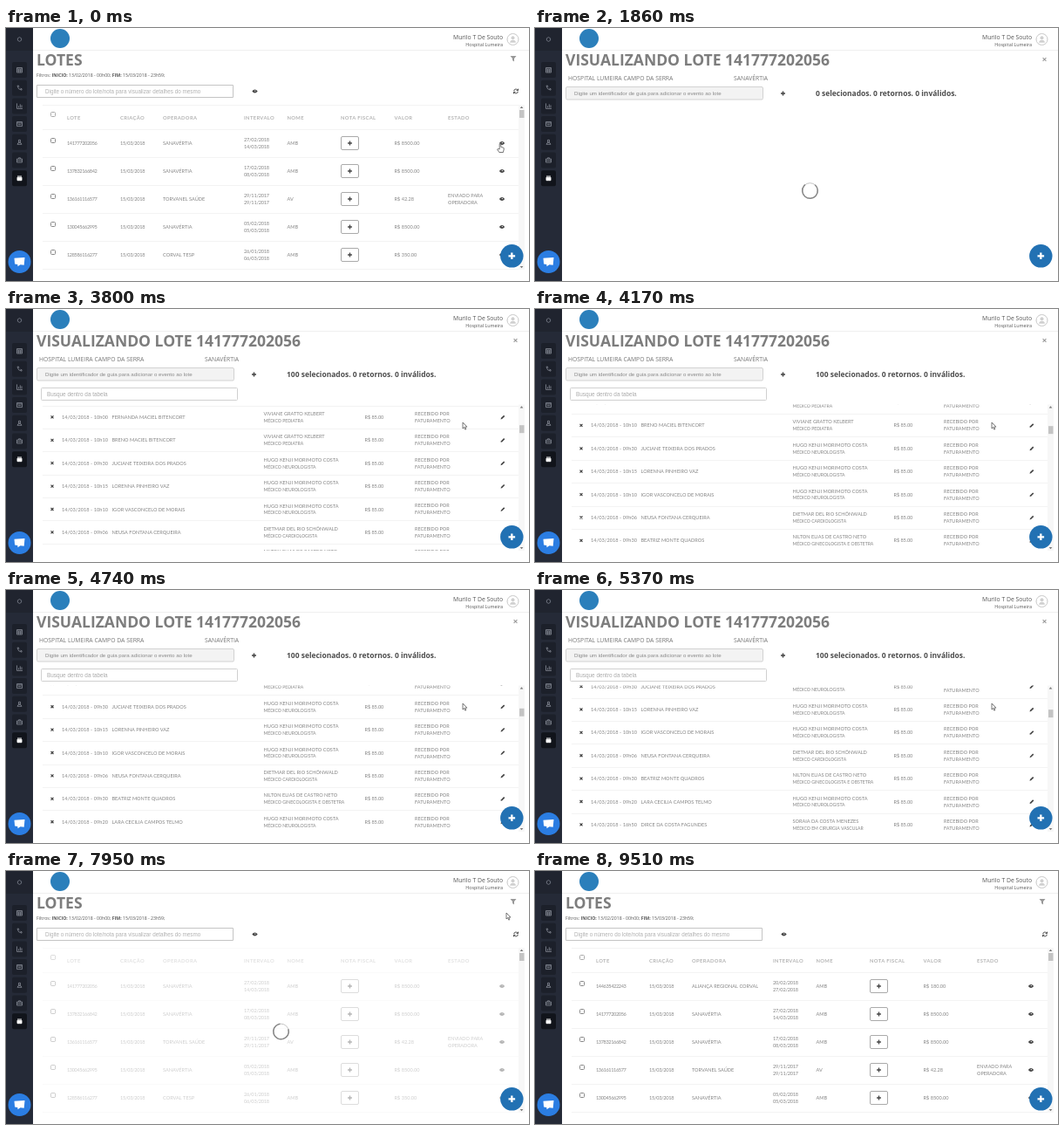
An HTML page with a canvas that plays this animation: 600x290 px, repeating every 9.84 s.

```html
<!DOCTYPE html>
<html lang="pt-BR">
<head>
<meta charset="utf-8">
<title>Lotes</title>
<style>
  html, body { margin: 0; width: 100%; height: 100%; overflow: hidden; background: #fff; }
  canvas { display: block; width: 600px; height: 290px; }
</style>
</head>
<body>
<canvas id="stage"></canvas>
<script>
const LOOP = 9840, OPEN = 720, LOADED = 2400, CLOSE = 7350, READY = 8990, NEW_LOT = 9510;
const canvas = document.getElementById('stage');
const ctx = canvas.getContext('2d');
const dpr = window.devicePixelRatio || 1;
canvas.width = 600 * dpr;
canvas.height = 290 * dpr;

const SANS = '"Open Sans", sans-serif', TABLE = 'Lato, sans-serif', INPUT = '"Liberation Sans", sans-serif';
const GREY = '#848484', INK = '#444', LINE = '#f3f3f3';

const lots = [
  ['144635422243', 'ALIANÇA REGIONAL CORVAL', '20/02/2018', '27/02/2018', 'AMB', '180.00'],
  ['141777202056', 'SANAVÉRTIA', '27/02/2018', '14/03/2018', 'AMB', '8500.00'],
  ['137832166842', 'SANAVÉRTIA', '17/02/2018', '08/03/2018', 'AMB', '8500.00'],
  ['136161116577', 'TORVANEL SAÚDE', '29/11/2017', '29/11/2017', 'AV', '42.28', true],
  ['130045662995', 'SANAVÉRTIA', '05/02/2018', '05/03/2018', 'AMB', '8500.00'],
  ['128586116277', 'CORVAL TESP', '26/01/2018', '06/03/2018', 'AMB', '350.00']
];

const doctors = {
  vascular: ['SORAIA DA COSTA MENEZES', 'EM CIRURGIA VASCULAR'],
  ear: ['PATRICIA LACERDA NOVAES', 'OTORRINOLARINGOLOGISTA'],
  birth: ['NILTON ELIAS DE CASTRO NETO', 'GINECOLOGISTA E OBSTETRA'],
  nerve: ['HUGO KENJI MORIMOTO COSTA', 'NEUROLOGISTA'],
  child: ['VIVIANE GRATTO KELBERT', 'PEDIATRA'],
  heart: ['DIETMAR DEL RIO SCHÖNWALD', 'CARDIOLOGISTA']
};

const visits = [
  ['16h50', 'DIRCE DA COSTA FAGUNDES', 'vascular'],
  ['15h45', 'RENATO AUGUSTO DE PAULA LEAL', 'ear'],
  ['16h40', 'SABRINA VALERIA FREITAS GALVAO', 'birth'],
  ['15h30', 'SABRINA VALERIA FREITAS GALVAO', 'nerve'],
  ['14h00', 'ROSANA MENDES DE BRITO', 'ear'],
  ['13h50', 'IVONETE MARQUES COSTA TAVARES', 'nerve'],
  ['13h30', 'OTAVIO LEMOS DA COSTA', 'nerve'],
  ['11h40', 'ELISA PRADO MONTEIRO', 'heart'],
  ['11h10', 'DAVI CORDEIRO FAGUNDES', 'child'],
  ['10h30', 'LIVIA CORDEIRO FAGUNDES', 'child'],
  ['10h00', 'FERNANDA MACIEL BITENCORT', 'child'],
  ['10h10', 'BRENO MACIEL BITENCORT', 'child'],
  ['09h30', 'JUCIANE TEIXEIRA DOS PRADOS', 'nerve'],
  ['10h15', 'LORENNA PINHEIRO VAZ', 'nerve'],
  ['10h10', 'IGOR VASCONCELO DE MORAIS', 'nerve'],
  ['09h06', 'NEUSA FONTANA CERQUEIRA', 'heart'],
  ['09h30', 'BEATRIZ MONTE QUADROS', 'birth'],
  ['09h20', 'LARA CECILIA CAMPOS TELMO', 'nerve']
];

const scrollKeys = [[3050, 0], [3800, 278], [3920, 290], [4050, 290], [4170, 295], [4370, 295],
  [4740, 321], [5040, 345], [5370, 345], [5840, 0]];
const cursorKeys = [[3050, 567, 133], [3290, 524, 130], [5800, 524, 130], [6090, 584, 34],
  [CLOSE, 584, 34], [7700, 574, 48]];

// Value of column `col` at time t, linear between keys.
function track(keys, t, col = 1) {
  const next = keys.findIndex(k => k[0] > t);
  if (next < 0) return keys[keys.length - 1][col];
  if (next === 0) return keys[0][col];
  const a = keys[next - 1], b = keys[next];
  return a[col] + (b[col] - a[col]) * (t - a[0]) / (b[0] - a[0]);
}

// y is the middle of the capitals.
function text(str, x, y, size, { font = TABLE, weight = 400, color = GREY, gap = 0, align = 'left' } = {}) {
  ctx.font = `${weight} ${size}px ${font}`;
  ctx.letterSpacing = gap + 'px';
  ctx.textAlign = align;
  ctx.fillStyle = color;
  ctx.fillText(str, x, y + size * 0.36);
}

function box(x, y, w, h, fill, stroke, radius = 0) {
  ctx.beginPath();
  ctx.roundRect(x, y, w, h, radius);
  paint(fill, stroke);
}

function disc(x, y, r, fill, stroke) {
  ctx.beginPath();
  ctx.arc(x, y, r, 0, 7);
  paint(fill, stroke);
}

function paint(fill, stroke, width = 1) {
  ctx.lineWidth = width;
  if (fill) { ctx.fillStyle = fill; ctx.fill(); }
  if (stroke) { ctx.strokeStyle = stroke; ctx.stroke(); }
}

function path(d, x, y, fill, stroke, width = 1) {
  ctx.save();
  ctx.translate(x, y);
  const shape = new Path2D(d);
  ctx.lineWidth = width;
  if (fill) { ctx.fillStyle = fill; ctx.fill(shape); }
  if (stroke) { ctx.strokeStyle = stroke; ctx.stroke(shape); }
  ctx.restore();
}

const rule = y => box(42, Math.round(y), 546, 1, LINE);
const plus = (x, y, r, color, width) => path(`M${-r} 0H${r}M0 ${-r}V${r}`, x, y, null, color, width);
const cross = (x, y, r, color, width) => path(`M${-r} ${-r}L${r} ${r}M${r} ${-r}L${-r} ${r}`, x, y, null, color, width);

function eye(x, y) {
  path('M-3.2 0Q0 -4.2 3.2 0Q0 4.2 -3.2 0Z', x, y, INK);
  disc(x + 0.3, y - 0.4, 0.7, '#fff');
}

function scrollbar(top, thumb) {
  box(588, top, 7, 277 - top, '#f7f7f7');
  box(589, thumb, 5.5, 9, '#c4c4c4');
  path('M-1.8 1L0 -1.2L1.8 1Z', 591.5, top + 3, '#777');
  path('M-1.8 -1L0 1.2L1.8 -1Z', 591.5, 274, '#777');
}

function headings(items, y) {
  for (const [label, x] of items) text(label, x, y, 5.8, { weight: 700, color: '#b4b4b4', gap: 0.35 });
}

function sidebar() {
  box(0, 0, 31, 290, '#252a37');
  box(0, 0, 31, 26, '#20242f');
  path('M0 -2.4L2.1 -1.2V1.2L0 2.4L-2.1 1.2V-1.2Z', 15.5, 13, null, '#7d828e', 0.8);
  const icons = [
    'M-3 -2.5H3V3H-3ZM-3 -1H3M-1 -1V3M1 -1V3M-3 1H3',
    'M-2.5 -2.5Q-2 2 2.5 2.5L2.6 1L1 .5M-2.5 -2.5L-1 -2.6L-.6 -1',
    'M-3 -3V3H3.5M-1 2V0M.8 2V-2M2.5 2V-1',
    'M-3 -2.5H3V2.5H-3ZM-3 -1.2H3M-1.8 .6H1.8',
    'M-1 -2.5H1V0H-1ZM-2.5 2.5Q-2 .5 0 .5T2.5 2.5Z',
    'M-3 -1.5H3V2.5H-3ZM-1 -1.5V-2.7H1V-1.5M-3 .5H3',
    'M-2.5 -1H2.5V2.5H-2.5ZM-2.5 -2.2H2.5'
  ];
  icons.forEach((d, i) => {
    const y = 48 + i * 20.7, active = i === 6;
    box(7, y - 9, 17, 18, active ? '#11141b' : '#1c202a', null, 2);
    path(d, 15.5, y, active ? '#fff' : null, active ? '#fff' : '#7d828d', 0.9);
  });
}

function header() {
  box(31, 25, 569, 1, '#f0f0f0');
  disc(62, 12, 11, '#2b7fbb');
  text('Murilo T De Souto', 570, 11, 6.8, { font: SANS, color: '#555', align: 'right' });
  text('Hospital Lumeira', 570, 19.5, 5.4, { font: SANS, color: '#555', align: 'right' });
  disc(581.5, 13, 6.5, '#fff', '#c8c8c8');
  disc(581.5, 11.3, 2, '#d0d0d0');
  path('M-3.5 3.8Q-3 .8 0 .8T3.5 3.8Z', 581.5, 13, '#d0d0d0');
}

function title(str) {
  text(str, 35, 37, 17.53, { font: SANS, weight: 700, color: '#7d7d7d' });
}

function lotRow(lot, y) {
  const [id, operator, from, to, name, value, sent] = lot;
  box(51.5, y - 5.5, 5, 5, '#fff', '#888', 1);
  text(id, 70, y, 5.6, { gap: -0.38 });
  text('15/03/2018', 131, y, 5.6, { gap: -0.28 });
  text(operator, 180, y, 5.6);
  text(from, 273, y - 4, 5.6, { gap: -0.22 });
  text(to, 273, y + 4, 5.6, { gap: -0.22 });
  text(name, 322.5, y, 5.6);
  box(384.5, y - 7.5, 20, 15, '#fff', '#aaa', 1.5);
  plus(394.5, y, 2.4, INK, 1.3);
  text('R$ ' + value, 445.5, y, 5.6);
  if (sent) {
    text('ENVIADO PARA', 507, y - 4, 5.5);
    text('OPERADORA', 507, y + 4, 5.5);
  }
  eye(569, y);
  rule(y + 16);
}

function lotsPage(t) {
  title('LOTES');
  let x = 35;
  [['Filtros: '], ['INICIO: ', 700], ['13/02/2018 - 00h00; '], ['FIM: ', 700], ['15/03/2018 - 23h59;']].forEach(([part, weight = 400]) => {
    text(part, x, 54.5, 5.2, { font: SANS, weight, color: '#555' });
    x += ctx.measureText(part).width;
  });
  path('M-3.5 -3H3.5L1 0V3.5L-1 2V0Z', 582, 35, '#999');
  box(35.5, 65.5, 225, 14, '#fff', '#c4c4c4');
  text('Digite o número do lote/nota para visualizar detalhes do mesmo', 45, 72.5, 6.3, { font: INPUT, color: '#b0b0b0' });
  eye(285.5, 72.5);
  path('M-2.3 -.4A2.3 2.3 0 0 1 1.8 -1.5M2.3 .4A2.3 2.3 0 0 1 -1.8 1.5M2.5 -2.8V-.8H.6M-2.5 2.8V.8H-.6', 585, 72.5, null, INK);

  ctx.save();
  ctx.beginPath();
  ctx.rect(36, 88, 552, 189);
  ctx.clip();
  if (t >= CLOSE) ctx.globalAlpha = track([[8800, 0.4], [READY, 1]], t);
  rule(88);
  box(51.5, 96.5, 5, 5, '#fff', '#aaa', 1);
  headings([['LOTE', 70], ['CRIAÇÃO', 131], ['OPERADORA', 180], ['INTERVALO', 273], ['NOME', 322.5],
    ['NOTA FISCAL', 384], ['VALOR', 445.5], ['ESTADO', 507]], 102.5);
  rule(116);
  const first = t >= NEW_LOT ? 0 : 1;
  lots.slice(first, first + 5).forEach((lot, i) => lotRow(lot, 132 + 32 * i));
  ctx.restore();
  scrollbar(88, 94);
  if (t >= CLOSE && t < READY) spinner(t, 184);
}

function visitRow([time, patient, key], y) {
  const [name, field] = doctors[key];
  cross(53, y, 1.5, INK, 1.2);
  text('14/03/2018 - ' + time, 64, y, 5.6, { gap: 0.06 });
  text(patient, 121.5, y, 5.6);
  text(name, 295.5, y - 4, 5.6);
  text('MÉDICO ' + field, 295.5, y + 4, 5.1);
  text('R$ 85.00', 411.5, y, 5.6, { gap: -0.1 });
  text('RECEBIDO POR', 469, y - 4, 5.5);
  text('FATURAMENTO', 469, y + 4, 5.5);
  path('M-2.5 2.5L-2 .9L1.1 -2.2L2.3 -1L-.9 2.1Z', 570, y, INK);
  rule(y + 13);
}

function visitTable(t) {
  const scroll = track(scrollKeys, t);
  box(40.5, 90.5, 225, 14, '#fff', '#d0d0d0', 1);
  text('Busque dentro da tabela', 47, 97.5, 6.4, { font: INPUT, color: '#aaa' });
  ctx.save();
  ctx.beginPath();
  ctx.rect(36, 109.5, 552, 167.5);
  ctx.clip();
  headings([['HORÁRIO', 64], ['PACIENTE', 121.5], ['PROFISSIONAL', 295.5], ['VALOR', 411.5],
    ['ESTADO', 469], ['RETORNO', 527]], 118 - scroll);
  rule(125 - scroll);
  for (let i = 0; i < 100; i++) {
    const y = 138 + 26.4 * i - scroll;
    if (y > 94 && y < 295) visitRow(visits[i % visits.length], y);
  }
  ctx.restore();
  scrollbar(109.5, 116.5 + scroll * 0.06);
}

function lotView(t) {
  const loaded = t >= LOADED;
  title('VISUALIZANDO LOTE 141777202056');
  text('HOSPITAL LUMEIRA CAMPO DA SERRA', 38, 57.5, 6.8, { font: SANS, color: '#777' });
  text('SANAVÉRTIA', 228, 57.5, 6.8, { font: SANS, color: '#777' });
  cross(584.5, 36, 1.9, '#999', 1.1);
  box(35.5, 67.5, 226, 14.5, '#f3f3f3', '#d2d2d2', 1.5);
  text('Digite um identificador de guia para adicionar o evento ao lote', 45, 75, 6.15, { font: INPUT, color: '#888' });
  plus(284.5, 75, 2.5, INK, 1.5);
  text(`${loaded ? 100 : 0} selecionados. 0 retornos. 0 inválidos.`, 322, 75, 8.47, { font: SANS, weight: 700, color: '#4c4c4c' });
  if (loaded) visitTable(t);
  else spinner(t, 186.5);
}

function spinner(t, y) {
  const angle = t / 1000 * 2 * Math.PI;
  disc(315.5, y, 8.8, null, '#c4c4c4');
  ctx.beginPath();
  ctx.arc(315.5, y, 8.8, angle, angle + 4.9);
  paint(null, '#888', 1.5);
}

function floatingButtons() {
  disc(15.5, 268, 13, '#2b7de2');
  path('M-6 -3.8L6 -4.6L5.2 4.2L1 3.7L-2 5.8L-2.2 3.4L-5.4 3Z', 15.5, 267.5, '#fff');
  disc(580.3, 261.3, 13.2, '#2271b3');
  plus(580.3, 261.3, 3.8, '#fff', 2.3);
}

function cursor(t) {
  if ((t >= OPEN && t < 2660) || t >= READY) return;
  const x = track(cursorKeys, t, 1), y = track(cursorKeys, t, 2);
  const hand = t < OPEN || (t >= 5980 && t < CLOSE);
  path(hand
    ? 'M-.8 0Q0 -.8 .8 0V3.4L3.8 4.2Q4.4 4.6 4.2 6L3.4 9.5H-1.2L-3.4 6Q-3 4.8 -.8 6Z'
    : 'M0 0V7L1.6 5.6L2.8 8.2L3.8 7.7L2.7 5.1H4.9Z', x, y, '#fff', '#555', 0.8);
}

function draw(now) {
  const t = now % LOOP;
  ctx.setTransform(dpr, 0, 0, dpr, 0, 0);
  box(0, 0, 600, 290, '#fff');
  header();
  if (t >= OPEN && t < CLOSE) lotView(t);
  else lotsPage(t);
  sidebar();
  floatingButtons();
  cursor(t);
}

const start = performance.now();
function tick() {
  draw(performance.now() - start);
  requestAnimationFrame(tick);
}
tick();
</script>
</body>
</html>
```
